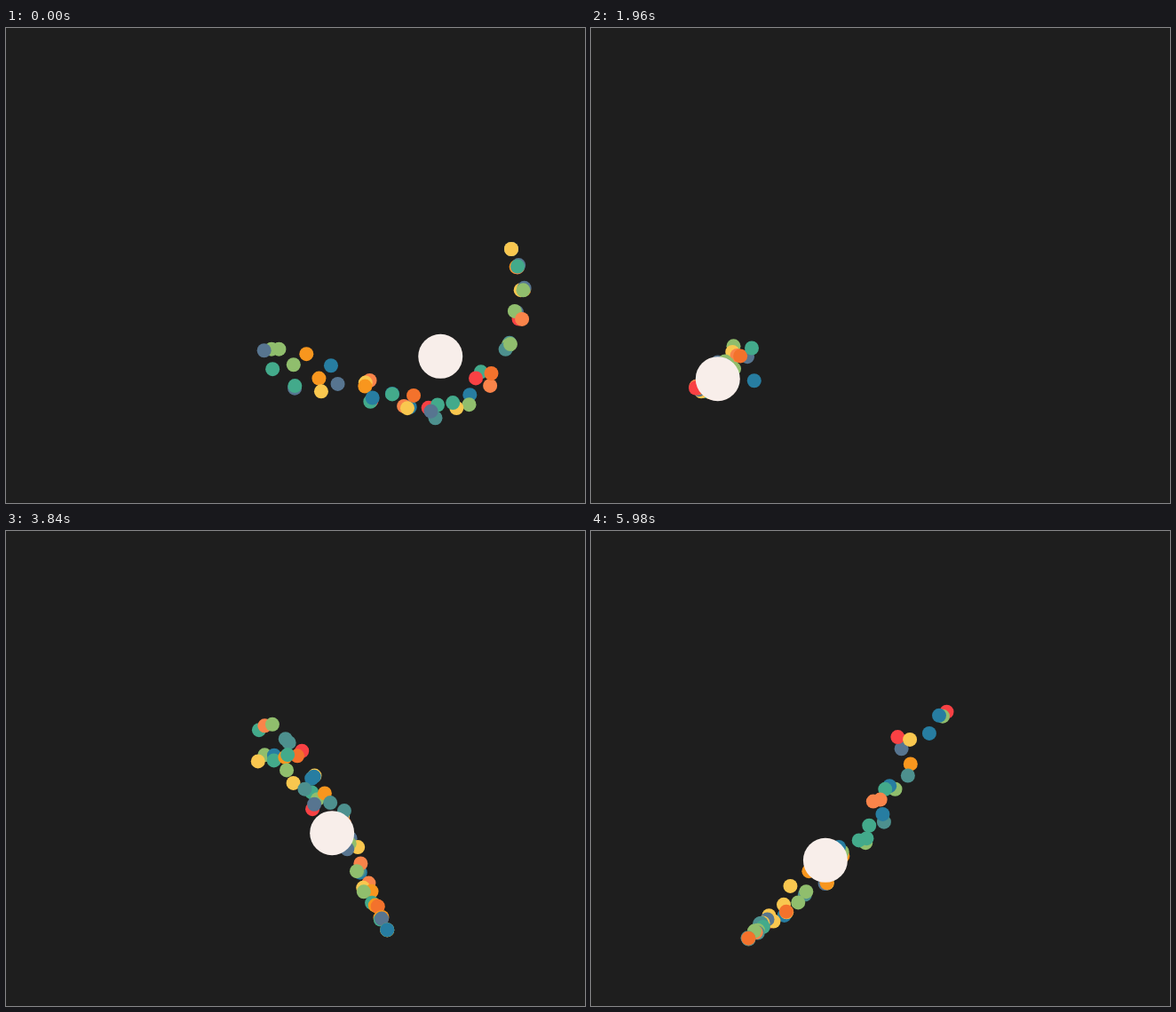
An HTML page with a canvas for the animation above (6 s loop, 652x535 px).

```html
<!DOCTYPE html>
<html lang="en">
<head>
<meta charset="utf-8">
<title>Confetti trail</title>
<style>
  html, body { margin: 0; width: 100%; height: 100%; overflow: hidden; background: #1e1e1e; }
  canvas { display: block; }
</style>
</head>
<body>
<canvas id="stage" width="652" height="535"></canvas>
<script>
const LOOP = 6000, TICK = 20;
const BIRTH_STEP = 100 / 3, BATCH = 4, LIFE = 440, DRIFT = 0.055;
const DOT_RADIUS = 8, BALL_RADIUS = 25, BALL_EASE = 110;
const BACKGROUND = '#1e1e1e', BALL_COLOR = '#f8eeea';
const COLORS = ['#f94144', '#f3722c', '#f8961e', '#f9844a', '#f9c74f',
                '#90be6d', '#43aa8b', '#4d908e', '#577590', '#277da1'];

// Key points of the pointer: [time, x, y]
const ROUTE = [
  [-433, 296, 377], [-300, 425, 419], [-200, 512, 420], [-100, 577, 323],
  [0, 569, 249], [240, 515, 165], [433, 415, 147], [600, 345, 164],
  [767, 298, 218], [1333, 188, 348], [1860, 130, 406], [2100, 90, 390],
  [2267, 58, 387], [2367, 35, 338], [2467, 47, 279], [2533, 66, 240],
  [2900, 115, 166], [3100, 148, 160], [3433, 298, 240], [3600, 368, 318],
  [3833, 429, 449], [4333, 505, 527], [4533, 530, 527], [4633, 565, 495],
  [4733, 582, 446], [4960, 592, 302], [5190, 512, 174], [5400, 430, 158],
  [5533, 403, 197], [5700, 300, 340], [5833, 215, 426], [5967, 177, 459]
];

const ctx = document.getElementById('stage').getContext('2d');

function slope(i, axis) {
  const a = ROUTE[Math.max(i - 1, 0)], b = ROUTE[Math.min(i + 1, ROUTE.length - 1)];
  return (b[axis] - a[axis]) / (b[0] - a[0]);
}

// Smooth cubic through the key points
function pointer(t) {
  t = Math.min(Math.max(t, ROUTE[0][0]), ROUTE[ROUTE.length - 1][0]);
  let i = 0;
  while (i < ROUTE.length - 2 && t > ROUTE[i + 1][0]) i++;
  const a = ROUTE[i], b = ROUTE[i + 1];
  const span = b[0] - a[0], u = (t - a[0]) / span, v = 1 - u;
  return [1, 2].map(axis =>
    v * v * (1 + 2 * u) * a[axis] + u * u * (3 - 2 * u) * b[axis] +
    span * u * v * (v * slope(i, axis) - u * slope(i + 1, axis)));
}

// The ball follows the pointer through two chained exponential eases
function ball(t) {
  let x = 0, y = 0, total = 0;
  for (let age = 5; age < 10 * BALL_EASE; age += 10) {
    const weight = age * Math.exp(-age / BALL_EASE), [px, py] = pointer(t - age);
    x += weight * px;
    y += weight * py;
    total += weight;
  }
  return [x / total, y / total];
}

function random(n, salt) {
  let h = Math.imul(n + 1000, 0x9e3779b1) ^ Math.imul(salt + 7, 0x85ebca6b);
  h = Math.imul(h ^ (h >>> 15), 0x2c1b3c6d);
  h = Math.imul(h ^ (h >>> 13), 0x297a2d39);
  return ((h ^ (h >>> 16)) >>> 0) / 4294967296;
}

function disc(x, y, radius, color) {
  ctx.fillStyle = color;
  ctx.beginPath();
  ctx.arc(x, y, radius, 0, 2 * Math.PI);
  ctx.fill();
}

// Each batch is born at the pointer and drifts apart until it expires
function drawBatch(g, t) {
  const born = g * BIRTH_STEP, reach = DRIFT * (t - born);
  const [x, y] = pointer(born);
  for (let n = g * BATCH; n < (g + 1) * BATCH; n++) {
    const dx = 2 * random(n, 1) - 1, dy = 2 * random(n, 2) - 1;
    const color = COLORS[Math.floor(random(n, 3) * COLORS.length)];
    disc(x + dx * reach, y + dy * reach, DOT_RADIUS, color);
  }
}

function draw(t) {
  ctx.fillStyle = BACKGROUND;
  ctx.fillRect(0, 0, 652, 535);
  const first = Math.ceil((t - LIFE) / BIRTH_STEP), last = Math.floor(t / BIRTH_STEP);
  for (let g = first; g <= last; g++) drawBatch(g, t);
  disc(...ball(t), BALL_RADIUS, BALL_COLOR);
}

const start = performance.now();

function frame() {
  const t = (performance.now() - start) % LOOP;
  draw(Math.floor(t / TICK) * TICK);
  requestAnimationFrame(frame);
}

frame();
</script>
</body>
</html>
```
